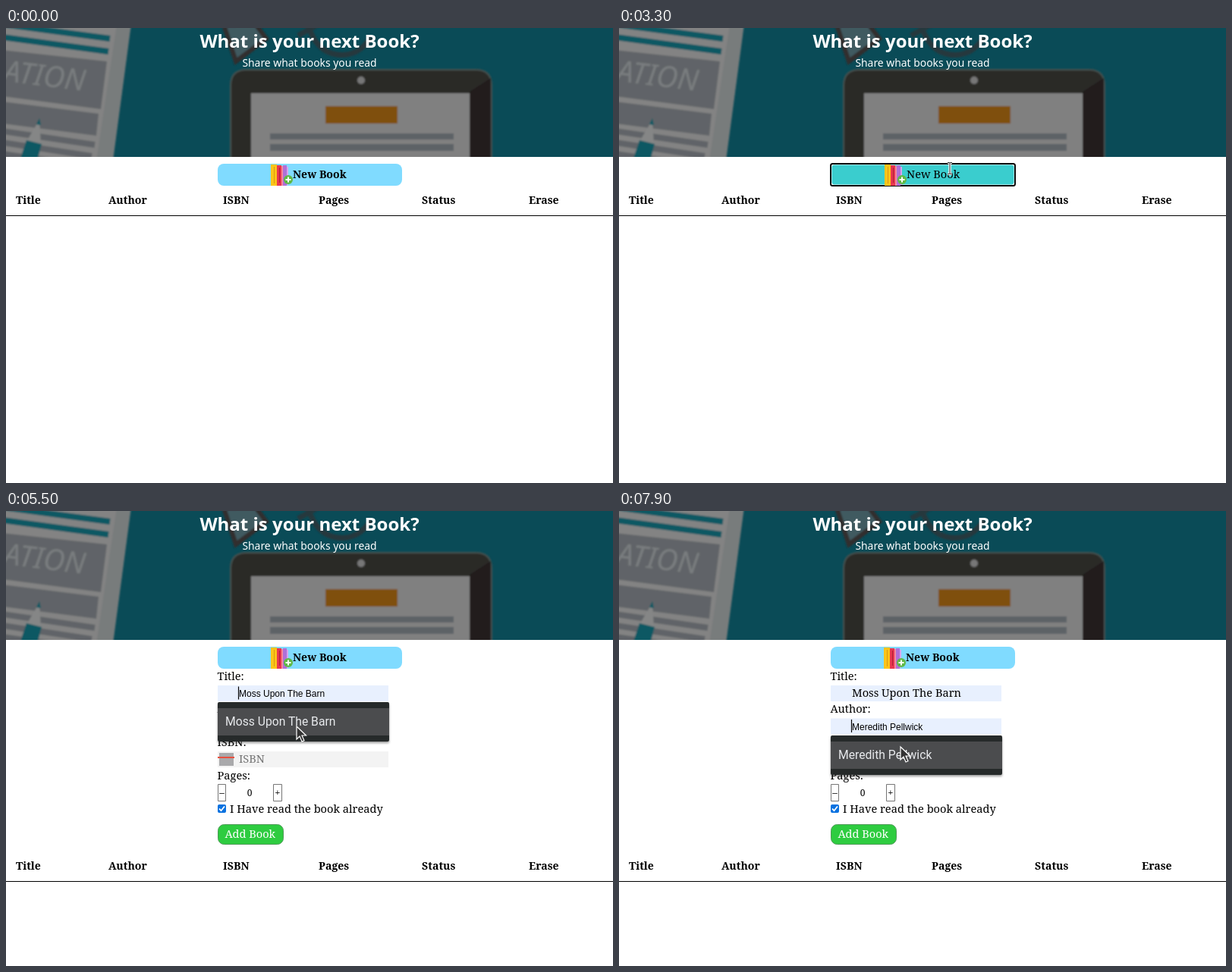
These frames come from a looping animation (800 px wide and 600 px high, 8000 ms). An HTML page:

```html
<!DOCTYPE html>
<html lang="en">
<head>
<meta charset="utf-8">
<title>Book list</title>
<style>
  html, body { margin: 0; width: 100%; height: 100%; overflow: hidden; background: #fff; }
  svg { display: block; width: 800px; height: 600px; font: 14.6px "Noto Serif", serif; }
  .bold { font-weight: 700; font-size: 14.1px; }
  .hint { fill: #757575; }
  .preview { font: 12px "Liberation Sans", Arial, sans-serif; }
  .sans { font-family: "Noto Sans", "Open Sans", sans-serif; fill: #fff; text-anchor: middle; }
</style>
</head>
<body>
<svg viewBox="0 0 800 600">
  <defs>
    <filter id="soft"><feGaussianBlur stdDeviation=".8"/></filter>
    <filter id="shadow"><feDropShadow dx="0" dy="2" stdDeviation="1.5" flood-opacity=".4"/></filter>
    <clipPath id="bannerClip"><path d="M0 0H800V170H0z"/></clipPath>
  </defs>

  <g clip-path="url(#bannerClip)">
    <path fill="#0a4b57" d="M0 0H800V170H0z"/>
    <g filter="url(#soft)">
      <!-- printed page and pencil -->
      <path fill="#787b7c" d="M-5-5H165L141 175H-5z"/>
      <path fill="#838383" d="M-5-5H146L119 175H-5z"/>
      <path stroke="#0b5863" stroke-width="8" d="M-5-5L137 14M-5 12L135 31"/>
      <path fill="#606467" d="M-5 29L133 44 125 107-5 90z"/>
      <text transform="translate(103 83) rotate(7)" text-anchor="end" fill="#797d7f"
            style="font:italic 39px 'Noto Sans',sans-serif">ATION</text>
      <path fill="#606467" d="M-5 97L122 113 119 142-5 126z"/>
      <path stroke="#606467" stroke-width="8" d="M-5 136L117 154M-5 151L113 169M-5 166L70 177"/>
      <path fill="#858686" d="M44 121L28 148 46 153z"/>
      <path fill="#0b5863" d="M44 119l-4 8 6 1zM27 148L47 153 41 175H18z"/>
      <!-- glasses -->
      <path fill="#3f5a61" stroke="#302d2d" stroke-width="6" d="M287-4L303 44 343 14 328-6z"/>
      <path fill="none" stroke="#28383d" stroke-width="7" d="M398-5Q408 31 436 35T481 12M385 10L410-4"/>
      <!-- tablet -->
      <path fill="#2b2928" stroke="#46514f" stroke-width="2" d="M296 175V76Q296 55 317 55H619Q640 55 640 76V175z"/>
      <path fill="#201d1c" d="M611 84L639 66V175H611z"/>
      <path fill="#808080" d="M323 86H611V175H323z"/>
      <circle cx="468" cy="69" r="5" fill="#777"/>
      <path fill="#7f4f0c" d="M421 103H516V126H421z"/>
      <path fill="#5d6266" d="M348 139H590V147H348zM348 153H590V162H348z"/>
    </g>
    <text class="sans" x="400" y="25.5" font-size="24" font-weight="700">What is your next Book?</text>
    <text class="sans" x="400" y="51" font-size="13.9">Share what books you read</text>
  </g>

  <!-- New Book button -->
  <rect id="button" x="279" y="179" width="243" height="29" rx="8"/>
  <g id="ring" fill="none">
    <rect x="280.5" y="180.5" width="240" height="26" rx="2" stroke="#fff" stroke-opacity=".5"/>
    <rect x="279" y="179" width="243" height="29" rx="2.5" stroke="#0c0c0c" stroke-width="2"/>
  </g>
  <g id="books">
    <path fill="#fcc419" d="M349 180h8v28h-8z"/>
    <path fill="#e8364f" d="M357 181h6v27h-6z"/>
    <path fill="#f58a9b" d="M363 182h2v26h-2z"/>
    <path fill="#b06fd8" d="M365 181h5v27h-5z"/>
    <path fill="#d5a6ee" d="M370 183h2v24h-2z"/>
    <path stroke="#d99a10" d="M353.5 183v22"/>
    <path stroke="#a81f38" d="M360.500 184v20"/>
    <circle cx="372" cy="200" r="6" fill="#5fb946"/>
    <path stroke="#fff" stroke-width="2" d="M368.500 200h7M372 196.500v7"/>
  </g>
  <text id="buttonBold" class="bold" x="378" y="198">New Book</text>
  <text id="buttonPlain" x="379" y="198">New Book</text>

  <g id="form">
    <text x="278.500" y="223">Title:</text>
    <text x="278.500" y="266">Author:</text>
    <text x="278.500" y="310">ISBN:</text>
    <text x="278.500" y="354">Pages:</text>

    <g id="titleField">
      <rect class="box" x="279" y="230" width="225" height="21"/>
      <g class="empty">
        <path fill="#6d4038" d="M279 234l3-1v13h17v-13l2 1v15h-22z"/>
        <path fill="#f6dcc0" d="M281 232q6-1 9 3 4-4 9-3v13q-6-1-9 2-4-3-9-2z"/>
        <path fill="#e2483d" d="M292 231h5v8l-2.500-2-2.500 2z"/>
        <text class="hint" x="307" y="245">The name of the Book</text>
      </g>
      <text class="preview" x="307" y="245">Moss Upon The Barn</text>
      <text class="filled" x="307" y="245">Moss Upon The Barn</text>
    </g>

    <g id="authorField" transform="translate(0 43.500)">
      <rect class="box" x="279" y="230" width="225" height="21"/>
      <g class="empty">
        <rect x="280" y="237" width="13" height="13" rx="3" fill="#b25fd6"/>
        <path fill="#43305c" d="M282 233h9v4h-9z"/>
        <path fill="#f3e3f7" d="M283 241h7v5h-7z"/>
        <path fill="#7a3c2b" d="M294 235q2-5 6-5 2 8-1 14l-2 6h-1l1-5q-4-3-3-10z"/>
        <text class="hint" x="307" y="245">The one that wrote it</text>
      </g>
      <text class="preview" x="307" y="245">Meredith Pellwick</text>
      <text class="filled" x="307" y="245">Meredith Pellwick</text>
    </g>

    <path fill="#f3f3f3" d="M279 317H504V338H279z"/>
    <path fill="#a9a9ab" d="M281 319H300V336H281z"/>
    <path stroke="#e8503f" stroke-width="2" d="M279 325H301"/>
    <text class="hint" x="307" y="332">ISBN</text>

    <path fill="#fff" stroke="#767676" d="M279.500 360.500h10v22h-10zM352.500 360.500h11v22h-11z"/>
    <g text-anchor="middle">
      <text x="284.500" y="376" font-size="13">–</text>
      <text x="358" y="376" font-size="13">+</text>
      <text x="321" y="376" font-size="12">0</text>
    </g>
    <rect x="279" y="387" width="11" height="11" rx="2" fill="#0b72e0"/>
    <path fill="none" stroke="#fff" stroke-width="1.800" d="M281 392.500l2.500 2.700 4.500-5.700"/>
    <text x="295" y="398">I Have read the book already</text>
    <rect x="279.500" y="413.500" width="86" height="26" rx="8" fill="#2ecc40" stroke="#4f9a58"/>
    <text x="288.500" y="431" fill="#fff">Add Book</text>
  </g>

  <g id="table" class="bold">
    <text x="13" y="232">Title</text>
    <text x="135" y="232">Author</text>
    <text x="286" y="232">ISBN</text>
    <text x="412" y="232">Pages</text>
    <text x="548" y="232">Status</text>
    <text x="689" y="232">Erase</text>
    <path stroke="#000" d="M0 247.500H800"/>
  </g>

  <path id="caret" stroke="#000" stroke-width="1.200" d="M0 231.500v17"/>

  <g id="dropdown">
    <rect x="279" y="252" width="226" height="52" rx="2" fill="#28292b" filter="url(#shadow)"/>
    <path id="choice" fill="#4b4c4e" d="M279 260H505V296H279z"/>
    <text id="choiceText" x="289" y="283" fill="#e8eaed"
          style="font:15.700px Roboto,sans-serif"></text>
  </g>

  <g id="beam" fill="none">
    <path id="beamShape" stroke="#fff" stroke-width="3" d="M-3-7.500h2.500l.5.500.5-.500H3M-3 7.500h2.500l.5-.500.5.500H3M0-7V7"/>
    <use href="#beamShape" style="stroke:#222"/>
    <path stroke="#222" d="M-3-7.500h2.500l.5.500.5-.500H3M-3 7.500h2.500l.5-.500.5.500H3M0-7V7"/>
  </g>
  <path id="arrow" fill="#333" stroke="#fff" stroke-width="1.200" d="M0 0V17l4-4 3 7 3-1.300-3-6.700h5.500z"/>
</svg>

<script>
const LOOP = 8000, STEP = 100;
const OPEN = 3400, TITLE_FOCUS = 4800, TITLE_HOVER = 5400, TITLE_DONE = 6000;
const AUTHOR_FOCUS = 7600, AUTHOR_HOVER = 7800;

// time, x, y of the pointer's hot spot
const path = [
  [1400, 737, 178], [1500, 690, 180], [1600, 622, 182], [1800, 506, 184],
  [1900, 466, 184], [2000, 444, 184], [2200, 444, 184], [2400, 436, 190],
  [2500, 436, 190], [2700, 436, 185], [3800, 436, 185], [4200, 416, 207],
  [4600, 393, 238], [5200, 393, 238], [5300, 390, 247], [5500, 383, 284],
  [5900, 383, 284], [6200, 379, 294], [6500, 373, 327], [6600, 372, 320],
  [6800, 372, 320], [7200, 371, 284], [7700, 371, 284], [7800, 371, 300],
  [7900, 371, 311], [LOOP, 371, 311]
];

const $ = id => document.getElementById(id);
const show = (el, on) => { el.style.display = on ? "" : "none"; };
const between = (v, a, b) => v >= a && v < b;

function pointerAt(t) {
  const i = path.findIndex(key => key[0] > t);
  const [t0, x0, y0] = path[i - 1], [t1, x1, y1] = path[i];
  const k = (t - t0) / (t1 - t0);
  return [x0 + (x1 - x0) * k, y0 + (y1 - y0) * k];
}

function setField(field, state) {
  for (const name of ["empty", "preview", "filled"])
    show(field.querySelector("." + name), name === state);
  field.querySelector(".box").setAttribute("fill", state === "empty" ? "#f3f3f3" : "#e8f0fe");
}

function drawPointer(t, listOpen) {
  const visible = t >= path[0][0];
  let x = 0, y = 0;
  if (visible) [x, y] = pointerAt(t);
  const overLabel = between(x, 377, 452) && between(y, 181, 206);
  const overField = [230, 273, 317].some(top => between(y, top, top + 22));
  const overList = listOpen && y > (t < TITLE_DONE ? 252 : 296);
  const isBeam = overLabel || (overField && !overList);
  for (const [el, on] of [[$("beam"), isBeam], [$("arrow"), !isBeam]]) {
    show(el, visible && on);
    el.setAttribute("transform", `translate(${x} ${y})`);
  }
  return visible && between(x, 279, 522) && between(y, 179, 208);
}

function render(time) {
  const t = Math.floor(time % LOOP / STEP) * STEP;
  const titleList = between(t, TITLE_FOCUS, TITLE_DONE);
  const authorList = t >= AUTHOR_FOCUS;
  const hover = drawPointer(t, titleList || authorList);

  $("button").setAttribute("fill", hover ? "#3acdce" : "#80dbff");
  $("books").setAttribute("transform", `translate(${hover ? 1 : 0} 0)`);
  show($("buttonPlain"), hover);
  show($("buttonBold"), !hover);
  show($("ring"), between(t, 3300, TITLE_FOCUS));

  show($("form"), t >= OPEN);
  $("table").setAttribute("transform", `translate(0 ${t >= OPEN ? 241 : 0})`);

  setField($("titleField"), t < TITLE_HOVER ? "empty" : t < TITLE_DONE ? "preview" : "filled");
  setField($("authorField"), t < AUTHOR_HOVER ? "empty" : "preview");

  const field = $(authorList ? "authorField" : "titleField");
  show($("dropdown"), titleList || authorList);
  $("dropdown").setAttribute("transform", `translate(0 ${authorList ? 44 : 0})`);
  $("choiceText").textContent = field.querySelector(".filled").textContent;
  show($("choice"), authorList ? t >= AUTHOR_HOVER : t >= TITLE_HOVER);

  const typed = between(t, TITLE_DONE, AUTHOR_FOCUS);
  const blinkOn = !typed || !between(t, 6500, 7000);
  const caretX = typed ? 307.5 + field.querySelector(".filled").getComputedTextLength() : 306.5;
  show($("caret"), t >= TITLE_FOCUS && blinkOn);
  $("caret").setAttribute("transform", `translate(${caretX} ${authorList ? 43.5 : 0})`);
}

const start = performance.now();
function tick() {
  render(performance.now() - start);
  requestAnimationFrame(tick);
}
tick();
</script>
</body>
</html>
```
